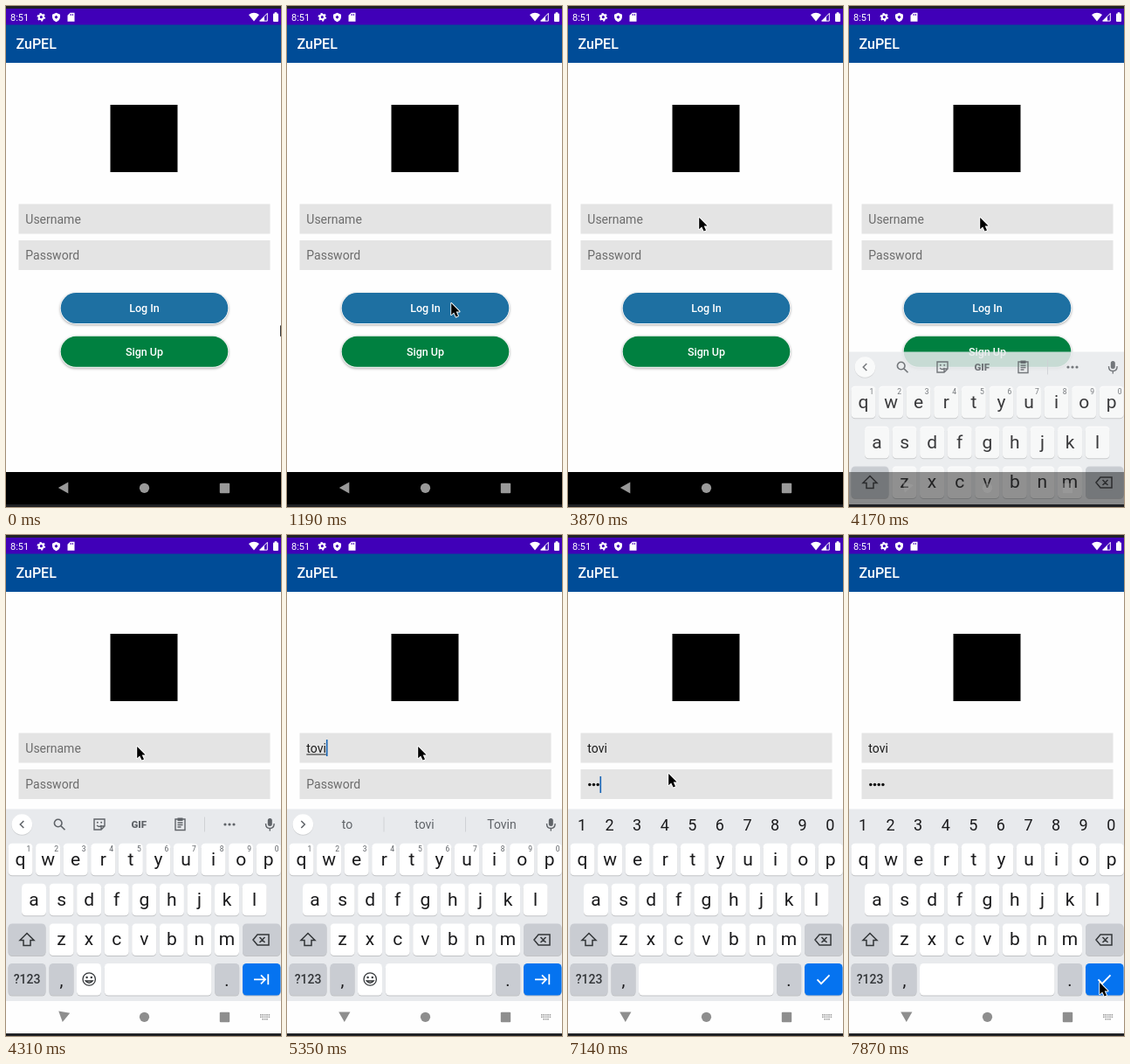
An HTML page with a canvas that plays this animation: 315 px wide and 573 px high, repeating every 8000 ms.

```html
<!DOCTYPE html>
<html lang="en">
<head>
<meta charset="utf-8">
<title>Login screen</title>
<style>
html, body { margin: 0; width: 100%; height: 100%; overflow: hidden; background: #fff; }
canvas { display: block; width: 315px; height: 573px; }
</style>
</head>
<body>
<canvas id="stage"></canvas>
<script>
const W = 315, H = 573, LOOP = 8000;
const APP = 'ZuPEL', USER = 'tovi';
const canvas = document.getElementById('stage');
const ratio = window.devicePixelRatio || 1;
canvas.width = W * ratio;
canvas.height = H * ratio;
const c = canvas.getContext('2d');

// ---------- helpers ----------
function rect(x, y, w, h, color) {
  c.fillStyle = color;
  c.fillRect(x, y, w, h);
}

function round(x, y, w, h, r, color) {
  c.fillStyle = color;
  c.beginPath();
  c.roundRect(x, y, w, h, r);
  c.fill();
}

function disc(x, y, r, color) {
  c.fillStyle = color;
  c.beginPath();
  c.arc(x, y, r, 0, 7);
  c.fill();
}

function text(s, x, y, size, color, align = 'left', weight = 400) {
  c.font = `${weight} ${size}px Roboto, sans-serif`;
  c.fillStyle = color;
  c.textAlign = align;
  c.fillText(s, x, y);
}

function fillPath(d, x, y, color) {
  c.save();
  c.translate(x, y);
  c.fillStyle = color;
  c.fill(new Path2D(d));
  c.restore();
}

function linePath(d, x, y, color, width = 1.4) {
  c.save();
  c.translate(x, y);
  c.strokeStyle = color;
  c.lineWidth = width;
  c.stroke(new Path2D(d));
  c.restore();
}

// ---------- timeline ----------
const STEP = 146.7;
const moves = [
  { at: 750, from: [313, 364], to: [187, 339] },
  { at: 1790, from: [187, 339], to: [149, 241] },
  { at: 5490, from: [149, 241], to: [114, 272] },
  { at: 7430, from: [114, 272], to: [286, 511] }
];
const progress = [0.3, 0.68, 0.93, 1];

function pointerAt(t) {
  let pos = moves[0].from;
  for (const m of moves) {
    if (t < m.at) break;
    const k = progress[Math.min(3, Math.floor((t - m.at + 2) / STEP))];
    pos = m.from.map((v, i) => v + (m.to[i] - v) * k);
  }
  return pos;
}

const typedCount = (t, start) =>
  t < start ? 0 : Math.min(4, 1 + Math.floor((t - start + 10) / STEP));

const between = (t, a, b) => t >= a && t < b;

function keyboardAt(t) {
  if (t < 4020) return null;
  if (t < 4170) return { drop: 158, alpha: 0.5, dim: 0.8, turn: 0 };
  if (t < 4310) return { drop: 82, alpha: 0.86, dim: 0.42, turn: -70 };
  return { drop: 0, alpha: 1, dim: 0, turn: t < 4460 ? -80 : -90 };
}

// ---------- app screen ----------
function statusBar() {
  rect(0, 0, W, 4, '#202126');
  rect(0, 3, W, 19, '#4000b8');
  text('8:51', 5, 16.5, 11, '#fff');
  c.setLineDash([2, 1.95]);
  linePath('M3.8 0A3.8 3.8 0 1 1-3.8 0A3.8 3.8 0 1 1 3.8 0', 40.3, 12.7, '#fff', 2);
  c.setLineDash([]);
  linePath('M2.6 0A2.6 2.6 0 1 1-2.6 0A2.6 2.6 0 1 1 2.6 0', 40.3, 12.7, '#fff', 2);
  fillPath('M0-5L4.5-3V0Q4 4 0 5.5Q-4 4-4.5 0V-3Z', 57.5, 12.7, '#fff');
  fillPath('M0-2L2 0L0 2L-2 0Z', 57.5, 12.7, '#4000b8');
  fillPath('M-1-5H4V5H-4V-2Z', 74.5, 12.7, '#fff');
  rect(73.6, 9, 1, 2, '#4000b8');
  rect(75.8, 9, 1, 2, '#4000b8');
  fillPath('M0 5L-6-2.5Q0-7 6-2.5Z', 284, 12.5, '#fff');
  linePath('M4.3-4.3V4.4H-4.4Z', 295, 12.7, '#fff', 1);
  fillPath('M1-1V4.5H-4.5Z', 295, 12.7, '#fff');
  round(306, 8.5, 6, 9.5, 1, '#fff');
  rect(307.7, 7.2, 2.6, 2, '#fff');
}

function field(y, label, filled) {
  rect(14.5, y, 288, 34, '#e4e4e4');
  text(label, 22.3, y + 22.3, 14, filled ? '#1c1c1c' : '#6c6c6c');
}

function button(y, label, color) {
  c.save();
  c.shadowColor = 'rgba(0,0,0,.35)';
  c.shadowBlur = 3 * ratio;
  c.shadowOffsetY = 1 * ratio;
  round(62, y - 0.5, 193, 36.5, 18.2, '#fff');
  c.restore();
  round(62.7, y, 191.6, 35, 17.5, color);
  text(label, 158.5, y + 22.3, 12.5, '#fff', 'center', 500);
}

function caret(x, y) {
  rect(x, y, 1.6, 19, '#1463b5');
}

function appScreen(t) {
  rect(0, 0, W, H, '#fefefe');
  statusBar();
  rect(0, 21.5, W, 43.5, '#004c97');
  text(APP, 11.5, 49.3, 16, '#fff', 'left', 500);
  rect(119.5, 113, 77, 77, '#000');

  const name = USER.slice(0, typedCount(t, 4900));
  field(226.5, name || 'Username', name);
  c.font = '400 14px Roboto, sans-serif';
  const nameWidth = c.measureText(name).width;
  if (name && t < 5940) rect(22.3, 250.5, nameWidth, 1, '#222');
  if (between(t, 3420, 3870) || between(t, 4460, 5940)) {
    caret(22.4 + nameWidth, 234);
  }

  const dots = typedCount(t, 6840);
  field(268, dots ? '' : 'Password', dots);
  for (let i = 0; i < dots; i++) disc(24.8 + i * 4.7, 285.5, 1.75, '#111');
  if (between(t, 5940, 6540) || between(t, 6840, 7870)) {
    caret(22.4 + dots * 4.7, 276);
  }

  button(328, 'Log In', '#1e70a2');
  button(377.8, 'Sign Up', '#008040');
}

// ---------- keyboard ----------
const INK = '#1b1b1d', GREY = '#5f6368', PITCH = 31.58;

function key(x, y, w, color = '#fff') {
  round(x, y + 1, w, 36.5, 4.5, 'rgba(0,0,0,.17)');
  round(x, y, w, 36.5, 4.5, color);
}

function letters(row, x0, y) {
  [...row].forEach((ch, i) => {
    const x = x0 + i * PITCH;
    key(x - 14, y, 28, '#fff');
    text(ch, x, y + 24.8, 21, INK, 'center');
  });
}

function mic() {
  round(299.8, 324, 5, 9, 2.5, GREY);
  linePath('M-4.8-1.5Q-4.8 4 0 4Q4.8 4 4.8-1.5M0 4V7', 302.3, 331.5, GREY);
}

function chevron(dir) {
  disc(18.3, 331.8, 12, 'rgba(0,0,0,.1)');
  disc(18.3, 331, 11.8, '#fff');
  linePath(`M${-2 * dir}-4L${2 * dir} 0L${-2 * dir} 4`, 18.3, 331, GREY, 1.5);
}

function toolStrip() {
  chevron(-1);
  linePath('M3 -1.5A4.3 4.3 0 1 1-5.6-1.5A4.3 4.3 0 1 1 3-1.5M1.8 1.6L6.5 6.3', 61, 331, GREY, 1.6);
  linePath('M-6-6H6V2L2 6H-6ZM6 2H2V6M-3 1Q0 4 2.5 1', 107, 331, GREY);
  disc(104.8, 328.8, 1, GREY);
  disc(109.2, 328.8, 1, GREY);
  text('GIF', 152.3, 335, 11.5, GREY, 'center', 900);
  linePath('M-5.5-5.5H5.5V7H-5.5ZM-3-1.5H3M-3 1H3M-3 3.5H1', 199.5, 330.5, GREY);
  rect(196.5, 323.5, 6, 3.5, GREY);
  rect(227, 322.5, 1, 17, '#cfd1d5');
  for (const x of [251, 256, 261]) disc(x, 331, 1.6, GREY);
  mic();
}

const guesses = [
  ['t', 'to', 'the'], ['to', 'too', 'took'], ['to', 'tov', 'tower'], ['to', USER, 'Tovin']
];

function wordStrip(words) {
  chevron(1);
  words.forEach((w, i) => text(w, 69 + i * 88.5, 336.3, 14, GREY, 'center'));
  rect(110.5, 322.5, 1, 17, '#cfd1d5');
  rect(204, 322.5, 1, 17, '#cfd1d5');
  mic();
}

function keyboard(t) {
  const secret = t >= 6090;
  const typed = typedCount(t, 4900);
  const special = '#c9ccd2';
  rect(0, 313.5, W, 220, '#e8eaed');
  rect(0, 533, W, 37, '#fefefe');

  if (secret) {
    [...'1234567890'].forEach((d, i) => text(d, 16 + i * PITCH, 338, 18, INK, 'center'));
  } else if (typed) {
    wordStrip(guesses[typed - 1]);
  } else {
    toolStrip();
  }

  letters('qwertyuiop', 16.5, 352.8);
  if (!secret) {
    [...'1234567890'].forEach((d, i) => text(d, 26 + i * PITCH, 362, 8.5, GREY, 'center'));
  }
  letters('asdfghjkl', 32, 398.8);
  letters('zxcvbnm', 63.5, 444.5);

  key(2.5, 444.5, 43, special);
  linePath('M0-7.5L8 .5H4V6.5H-4V.5H-8Z', 24, 463, '#333639', 1.5);
  key(271, 444.5, 43.5, special);
  linePath('M-9 0L-4-6H9V6H-4ZM-1.5-3L4.5 3M4.5-3L-1.5 3', 292, 463, '#333639', 1.5);

  key(2.5, 490, 43, special);
  text('?123', 24, 513.3, 14, '#333639', 'center', 500);
  key(49.5, 490, 28, special);
  text(',', 63.5, 515.5, 20, INK, 'center');
  if (secret) {
    key(81, 490, 154.5);
  } else {
    key(81, 490, 28);
    linePath('M7.2 0A7.2 7.2 0 1 1-7.2 0A7.2 7.2 0 1 1 7.2 0M-4 2Q0 6.5 4 2Z', 95.2, 508, '#333639', 1.3);
    disc(92.6, 506, 1.2, '#333639');
    disc(97.8, 506, 1.2, '#333639');
    key(112.8, 490, 122.7);
  }
  key(239.2, 490, 28, special);
  text('.', 253, 515.5, 20, INK, 'center');
  key(271, 490, 43.5, '#0573f0');
  const mark = secret ? 'M-7 0L-2.5 4.8L7-5' : 'M-8.5 0H4M-.5-5L4.5 0L-.5 5M7.8-6V6';
  linePath(mark, 292.5, 508.3, '#fff', 1.8);
}

// ---------- system bar ----------
function navIcons(turn, color) {
  c.save();
  c.translate(65.8, 551);
  c.rotate(turn * Math.PI / 180);
  fillPath('M-6 0L5.5-6.6V6.6Z', 0, 0, color);
  c.restore();
  disc(158.5, 551.3, 5.6, color);
  round(244.8, 545.8, 11.4, 11.4, 1, color);
}

function keyboardIcon() {
  for (let row = 0; row < 3; row++) {
    for (let i = 0; i < 5; i++) {
      if (row < 2 || (i > 0 && i < 4)) rect(291 + i * 2.4, 548 + row * 2.5, 1.6, 1.6, '#a0a0a0');
    }
  }
}

function pointer([x, y]) {
  const arrow = new Path2D('M1.2 1V14.2L4.2 11.4L6.6 16.6L9 15.5L6.7 10.5H10.6Z');
  c.save();
  c.translate(x, y);
  c.lineJoin = 'round';
  c.lineWidth = 1.8;
  c.strokeStyle = '#fff';
  c.stroke(arrow);
  c.fillStyle = '#000';
  c.fill(arrow);
  c.restore();
}

function draw(t) {
  c.setTransform(ratio, 0, 0, ratio, 0, 0);
  appScreen(t);
  const kb = keyboardAt(t);
  if (kb) {
    c.save();
    c.beginPath();
    c.rect(0, 0, W, 570);
    c.clip();
    c.translate(0, kb.drop);
    c.globalAlpha = kb.alpha;
    keyboard(t);
    c.restore();
    rect(0, 533, W, 37, `rgba(0,0,0,${kb.dim})`);
    c.globalAlpha = kb.drop ? 0.35 : 1;
    navIcons(kb.turn, kb.drop ? '#aaa' : '#8e8e8e');
    c.globalAlpha = 1;
    if (!kb.drop) keyboardIcon();
  } else {
    rect(0, 533, W, 37, '#000');
    navIcons(0, '#999');
  }
  rect(0, 570, W, 3, '#202124');
  pointer(pointerAt(t));
}

function tick(now) {
  draw(now % LOOP);
  requestAnimationFrame(tick);
}
requestAnimationFrame(tick);
</script>
</body>
</html>
```
